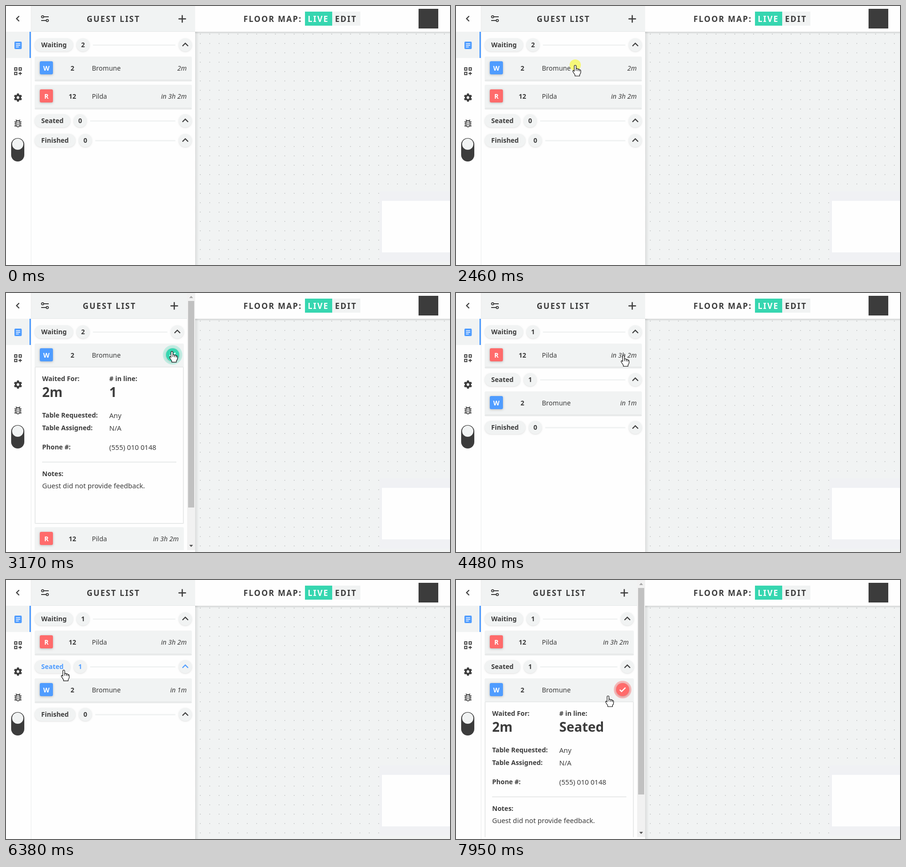
An HTML page with a canvas for the animation above (8 s loop, 946x553 px).

```html
<!DOCTYPE html>
<html lang="en">
<head>
<meta charset="utf-8">
<title>Guest list</title>
<style>
html, body { margin: 0; width: 946px; height: 553px; overflow: hidden; background: #fefefe; }
canvas { display: block; }
</style>
</head>
<body>
<canvas id="stage" width="946" height="553"></canvas>
<script>
const c = document.getElementById('stage').getContext('2d');
const LOOP = 8000, STEP = 77.5;
const DARK = '#3c3c3c', BLUE = '#4f9cff', RED = '#ff6b6b', GREEN = '#36d6b0';
const GREY = '#f1f3f3', EDGE = '#e8eaea', WHITE = '#fefefe';
const FACE = '"Noto Sans", "Open Sans", sans-serif';
const LIST_BOTTOM = 549;

// Moments at which something starts; motion advances in even steps from each.
const starts = [0, 210, 600, 1450, 2460, 2620, 3480, 4330, 4480, 5030, 5910, 6780, 7400];
const clicks = [[2460, 2615], [4330, 4475], [7400, 7475]];

// Pointer path: time, x, y
const path = [
  [210, 531, 541], [370, 472, 506], [600, 472, 506], [1000, 352, 320], [1370, 272, 124],
  [1600, 212, 150], [1800, 228, 148], [2000, 254, 126], [2620, 254, 126], [2900, 310, 128],
  [3165, 354, 124], [3400, 351, 126], [3560, 346, 139], [3790, 357, 133], [5030, 357, 133],
  [5350, 290, 185], [5600, 240, 244], [5830, 215, 236], [5910, 205, 231], [6230, 124, 184],
  [6378, 123, 192], [6550, 135, 215], [6700, 161, 231], [7250, 248, 236], [7475, 248, 236],
  [7943, 324, 247], [8000, 327, 248]
];

const guestA = { tag: 'W', color: BLUE, size: 2, name: 'Bromune' };
const guestB = { tag: 'R', color: RED, size: 12, name: 'Pilda' };

const clamp = v => Math.max(0, Math.min(1, v));
const smooth = v => (v = clamp(v), v * v * (3 - 2 * v));

function snap(t) {
  const from = starts.filter(s => s <= t).pop();
  return from + Math.floor((t - from) / STEP) * STEP;
}

function pointerAt(t) {
  if (t < path[0][0]) return { x: -50, y: -50 };
  const i = path.findIndex(p => p[0] > t);
  const [t0, x0, y0] = path[i - 1], [t1, x1, y1] = path[i];
  const k = (t - t0) / (t1 - t0);
  return { x: x0 + (x1 - x0) * k, y: y0 + (y1 - y0) * k };
}

function box(x, y, w, h, color, r = 0) {
  c.fillStyle = color;
  c.beginPath();
  c.roundRect(x, y, w, h, r);
  c.fill();
}

function disc(x, y, r, color) {
  c.fillStyle = color;
  c.beginPath();
  c.arc(x, y, r, 0, 7);
  c.fill();
}

function shadowed(draw, alpha = .12, blur = 3) {
  c.save();
  c.shadowColor = `rgba(0,0,0,${alpha})`;
  c.shadowBlur = blur;
  c.shadowOffsetY = 1;
  draw();
  c.restore();
}

function text(s, x, y, style = 'bold 14px', color = DARK, align = 'left', spacing = 0) {
  c.font = `${style} ${FACE}`;
  c.letterSpacing = spacing + 'px';
  c.textAlign = align;
  c.fillStyle = color;
  c.fillText(s, x, y);
  return c.measureText(s).width;
}

function lines(d, x, y, color = DARK, width = 2, fill) {
  c.save();
  c.translate(x, y);
  const p = new Path2D(d);
  if (fill) { c.fillStyle = fill; c.fill(p); }
  c.strokeStyle = color;
  c.lineWidth = width;
  c.stroke(p);
  c.restore();
}

function drawSidebar() {
  box(0, 0, 54, 553, WHITE);
  box(53, 0, 1, 553, '#ebecec');
  lines('M3 -5.5L-2.5 0L3 5.5', 25, 27, DARK, 2.2);
  box(0, 55, 50, 56, GREY);
  box(50, 55, 3, 56, BLUE);
  box(18, 76, 15.5, 16, BLUE, 2);
  lines('M-4.5 -3.5H4.5M-4.5 0H4.5M-4.5 3.5H1.5', 25.7, 84, '#fff', 1.6);
  lines('M-7 -7h5v5h-5zM2.5 -7h5v5h-5zM-7 2.5h5v5h-5zM5 1.5v7M1.5 5h7', 25.3, 139, DARK, 1.8);

  // Gear
  c.save();
  c.translate(25.5, 195.5);
  c.strokeStyle = DARK;
  c.lineWidth = 3.8;
  c.beginPath();
  c.arc(0, 0, 4.8, 0, 7);
  c.stroke();
  for (let i = 0; i < 6; i++) {
    box(-2.2, -8.7, 4.4, 4, DARK, .5);
    c.rotate(Math.PI / 3);
  }
  c.restore();

  // Bug
  lines('M-4 -2a4 4 0 0 1 8 0v5a4 4 0 0 1 -8 0zM-4.5 -8L-2 -5.5M4.5 -8L2 -5.5' +
    'M-7.5 -3.5H-4M4 -3.5H7.5M-7.5 .7H-4M4 .7H7.5M-7.5 5H-4M4 5H7.5M-1.8 -1.3H1.8M-1.8 2.7H1.8', 25.5, 251, DARK, 1.8);

  box(11, 282, 28, 50, DARK, 14);
  disc(25, 295, 12, GREY);
}

function drawMap() {
  box(403, 55, 543, 498, GREY);
  for (let x = 414; x < 946; x += 20)
    for (let y = 60; y < 553; y += 20) disc(x, y, .9, '#bfc2c2');
  box(796, 396, 150, 150, '#f0f1f4');
  box(801, 416, 145, 110, WHITE);

  const side = c.createLinearGradient(403, 0, 411, 0);
  side.addColorStop(0, 'rgba(0,0,0,.09)');
  side.addColorStop(1, 'rgba(0,0,0,0)');
  box(403, 55, 8, 498, side);

  const top = c.createLinearGradient(0, 55, 0, 60);
  top.addColorStop(0, 'rgba(0,0,0,.13)');
  top.addColorStop(1, 'rgba(0,0,0,0)');
  box(403, 55, 543, 5, top);
  box(403, 0, 543, 55, WHITE);

  text('FLOOR MAP:', 506, 34, 'bold 17px', DARK, 'left', 2);
  box(637, 12, 58, 30, GREEN);
  box(695, 12, 60, 30, GREY);
  text('LIVE', 643, 34, 'bold 17px', '#fff', 'left', 2);
  text('EDIT', 701, 34, 'bold 17px', DARK, 'left', 2);
  box(879, 6, 42, 42, DARK);
}

function drawSection(name, count, y, right, pointer) {
  const over = pointer.x >= 61 && pointer.x <= right && pointer.y >= y && pointer.y < y + 28;
  const ink = over ? BLUE : DARK;
  c.font = `bold 14px ${FACE}`;
  c.letterSpacing = '0px';
  const w = Math.round(c.measureText(name).width) + 28;
  const mid = y + 14, num = 61 + w + 21;
  shadowed(() => {
    box(61, y, w, 28, GREY, 14);
    disc(num, mid, 14, GREY);
    disc(right - 14, mid, 14, GREY);
  });
  box(num + 21, mid - 1, right - 35 - num - 21, 3, GREY, 1);
  text(name, 75, mid + 5, undefined, ink);
  text(count, num, mid + 5, undefined, ink, 'center');
  lines('M-6 3L0 -3L6 3', right - 14, mid - .5, ink, 2.2);
  return over;
}

function drawDetails(y, h, right, grow, seated) {
  const w = right - 61;
  box(61, y, w, h, EDGE, 2);
  if (!grow) return;
  box(63, y + 2, w - 4, h - 4, WHITE);
  c.save();
  c.beginPath();
  c.rect(63, y + 2, w - 4, h - 4);
  c.clip();
  const pad = 15 * grow ** .8;
  const a = 62 + pad, b = a + (w - 2 - 2 * pad) / 2, base = y + 16 + pad;
  const value = '14.67px';
  text('Waited For:', a, base);
  text('# in line:', b, base);
  text('2m', a, base + 34, 'bold 28px');
  text(seated ? 'Seated' : '1', b, base + 34, 'bold 28px');
  text('Table Requested:', a, base + 78);
  text('Any', b, base + 79, value);
  text('Table Assigned:', a, base + 105);
  text('N/A', b, base + 106, value);
  text('Phone #:', a, base + 146);
  text('(555) 010 0148', b, base + 147, value);
  box(a, base + 172, w - 2 - 2 * pad, 2, EDGE);
  text('Notes:', a, base + 203);
  text('Guest did not provide feedback.', a, base + 229, value);
  c.restore();
}

function drawCard(guest, y, right, time, open, pointer, seated) {
  const h = 4 + 332 * open.grow;
  drawDetails(y + 49, h, right, open.grow, seated);
  box(61, y, right - 61, 49, GREY, [3, 3, 0, 0]);
  shadowed(() => box(72, y + 10, 28, 28, guest.color, 3), .25, 5);
  text(guest.tag, 86, y + 30, undefined, '#fff', 'center');
  text(guest.size, 141.5, y + 30, undefined, DARK, 'center');
  text(guest.name, 183, y + 30, '14px');
  if (open.grow) {
    const x = right - 24, wave = clamp((open.age - 350) / 400);
    const color = seated ? RED : GREEN;
    if (wave > 0 && wave < 1) {
      c.globalAlpha = .8 * (1 - wave);
      disc(x, y + 24, 14 + 10 * wave, color);
      c.globalAlpha = 1;
    }
    shadowed(() => disc(x, y + 24, 14, color), .2, 4);
    lines('M-6 .3L-2.2 4L6 -4.2', x, y + 24, '#fff', 2.4);
  } else {
    text(time, right - 11, y + 30, 'italic 14px', DARK, 'right');
  }
  return pointer.x >= 61 && pointer.x <= right && pointer.y >= y && pointer.y < y + 53;
}

function drawScrollbar(total) {
  box(386, 0, 17, LIST_BOTTOM, '#f1f1f1');
  box(388, 17, 13, (LIST_BOTTOM - 34) * LIST_BOTTOM / total, '#c1c1c1');
  lines('M-3.5 2L0 -2L3.5 2Z', 394.5, 8.5, '#a3a3a3', .5, '#a3a3a3');
  lines('M-3.5 -2L0 2L3.5 -2Z', 394.5, 540, '#505050', .5, '#505050');
}

function drawList(t, pointer) {
  const seated = t >= 4475;
  const begun = seated ? 7400 : 2542.5;
  const age = t - begun;
  const open = { age, grow: age >= STEP - .1 ? smooth(age / 280) : 0 };
  const shut = { age: 0, grow: 0 };
  const total = 309 + 332 * open.grow;
  const scrolls = total > LIST_BOTTOM;
  const edge = scrolls ? 386 : 403, right = edge - 7;

  box(54, 0, 349, 553, WHITE);
  box(54, 0, edge - 54, 55, GREY);
  box(54, 54, edge - 54, 1, '#e4e6e6');
  lines('M-3 -4H8M-8 4H3', 83, 27, DARK, 1.8);
  lines('M-7.5 -4a2.4 2.4 0 1 0 4.8 0a2.4 2.4 0 1 0 -4.8 0zM2.7 4a2.4 2.4 0 1 0 4.8 0a2.4 2.4 0 1 0 -4.8 0z',
    83, 27, DARK, 1.8, GREY);
  text('GUEST LIST', edge === 403 ? 172 : 163.5, 34, 'bold 17px', DARK, 'left', 2);
  lines('M-8 0H8M0 -8V8', edge - 27.5, 27.5, DARK, 2.5);

  c.save();
  c.beginPath();
  c.rect(54, 55, edge - 54, LIST_BOTTOM - 55);
  c.clip();
  const rowA = [guestA, seated ? 'in 1m' : '2m', open], rowB = [guestB, 'in 3h 2m', shut];
  const sections = [
    ['Waiting', seated ? [rowB] : [rowA, rowB]],
    ['Seated', seated ? [rowA] : []],
    ['Finished', []]
  ];
  let y = 69, hot = false;
  for (const [name, rows] of sections) {
    hot = drawSection(name, rows.length, y, right, pointer) || hot;
    y += 39;
    for (const [guest, time, state] of rows) {
      hot = drawCard(guest, y, right, time, state, pointer, seated) || hot;
      y += 60 + 332 * state.grow;
    }
    y += 3;
  }
  c.restore();
  if (scrolls) drawScrollbar(total);
  return hot;
}

function drawPointer({ x, y }, hand) {
  c.lineJoin = 'round';
  if (hand) {
    lines('M-2 2Q-2 0 0 0Q2 0 2 2V8Q2.5 6.8 4 7Q5.8 7.2 5.8 9Q6.5 7.8 8 8.2Q9.2 8.6 9.2 10' +
      'Q11.8 9 11.8 12V15Q11.8 18 9.5 20V23H-.5V20.5L-4.8 14Q-5.8 11.5 -4 11.2Q-3 11.2 -2 13Z' +
      'M2 8V12M5.8 9V12.5M9.2 10V13', x, y + .5, '#111', 1.2, '#fff');
  } else {
    lines('M.5 .5V16.5L4.2 13L6.7 18.5L9 17.5L6.6 12.2H11.5Z', x, y, '#111', 1, '#fff');
  }
  c.lineJoin = 'miter';
}

function draw(now) {
  const t = snap(now % LOOP), pointer = pointerAt(t);
  drawMap();
  drawSidebar();
  const hand = drawList(t, pointer);
  if (clicks.some(([a, b]) => t >= a && t < b)) disc(pointer.x, pointer.y, 12, 'rgba(250,250,20,.55)');
  drawPointer(pointer, hand);
}

const begin = performance.now();
(function loop() {
  draw(performance.now() - begin);
  requestAnimationFrame(loop);
})();
</script>
</body>
</html>
```
